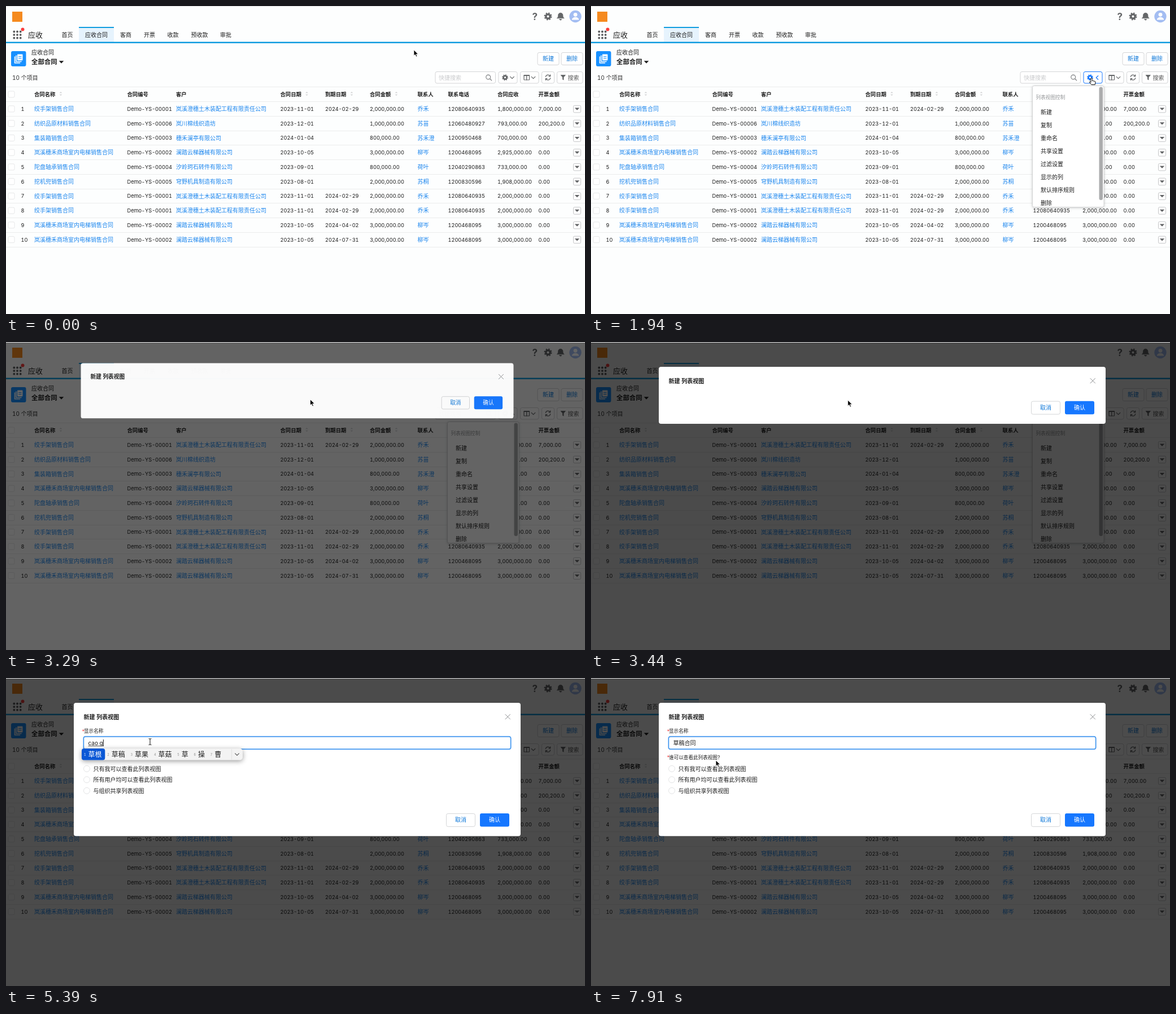
Animation, 1025 px wide and 546 px high, one loop 8000 ms. Source, as an HTML page:

```html
<!DOCTYPE html>
<html lang="zh-CN">
<head>
<meta charset="utf-8">
<title>列表视图</title>
<style>
html, body { margin: 0; width: 100%; height: 100%; overflow: hidden; background: #fdfefe; }
svg { display: block; width: 100vw; height: 100vh; }
text { font-family: Inter, "Noto Sans CJK SC", "Noto Sans CJK", sans-serif; font-feature-settings: "tnum"; white-space: pre; }
</style>
</head>
<body>
<svg id="stage" viewBox="0 0 1025 546"><g id="page"></g><g id="live"></g></svg>
<script>
const LOOP = 8000;
const INK = '#1c1c1c', LINK = '#1a85ee', BLUE = '#1677ff', GREY = '#646668', EDGE = '#d4d5d7';

// Drawing helpers; text is placed by its vertical centre.
const text = (x, y, str, size = 10, fill = INK, weight = 400) =>
  `<text x="${x}" y="${y + size * 0.375}" font-size="${size}" fill="${fill}" font-weight="${weight}">${str}</text>`;
const rect = (x, y, w, h, fill, r = 0, stroke = 'none', sw = 1) =>
  `<rect x="${x}" y="${y}" width="${w}" height="${h}" rx="${r}" fill="${fill}" stroke="${stroke}" stroke-width="${sw}"/>`;
const circle = (x, y, r, fill, stroke = 'none', sw = 1, extra = '') =>
  `<circle cx="${x}" cy="${y}" r="${r}" fill="${fill}" stroke="${stroke}" stroke-width="${sw}" ${extra}/>`;
const path = (d, fill, stroke = 'none', sw = 1) =>
  `<path d="${d}" fill="${fill}" stroke="${stroke}" stroke-width="${sw}" stroke-linecap="round" stroke-linejoin="round"/>`;
const at = (x, y, body, more = '') => `<g transform="translate(${x} ${y}) ${more}">${body}</g>`;
const box = (x, y, w, h, stroke = EDGE) => rect(x, y, w, h, '#fff', 3, stroke);
const triangle = (x, y, w, fill) => path(`M${x - w} ${y - w / 2}h${2 * w}l${-w} ${w}z`, fill);
const chevron = (x, y, color, turn = 0) =>
  at(x, y, path('M-3.3 -1.7L0 1.7L3.3 -1.7', 'none', color, 1.2), `rotate(${turn})`);
const gear = (x, y, r, color) =>
  circle(x, y, r * 0.55, 'none', color, r * 0.5) +
  circle(x, y, r * 0.88, 'none', color, r * 0.3, `stroke-dasharray="${r * 0.3456}"`);

const columns = [
  [50, '合同名称'], [214.5, '合同编号'], [301, '客户'], [485.5, '合同日期'], [565, '到期日期'],
  [644, '合同金额'], [728.5, '联系人'], [782.5, '联系电话'], [870, '合同应收'], [942.5, '开票金额']
];
const linked = [0, 2, 6], sortable = [0, 3, 4, 5];

const scaffold = '绞手架销售合同|Demo-YS-00001|岚溪澄穗土木装配工程有限责任公司|2023-11-01|2024-02-29|2,000,000.00|乔禾|12080640935|';
const lift = due => `岚溪穗禾商场室内电梯销售合同|Demo-YS-00002|澜踏云梯器械有限公司|2023-10-05|${due}|3,000,000.00|柳岑|1200468095|`;
const rows = [
  scaffold + '1,800,000.00|7,000.00',
  '纺织品原材料销售合同|Demo-YS-00006|岚川棉线织造坊|2023-12-01||1,000,000.00|苏苗|12060480927|793,000.00|200,200.00',
  '集装箱销售合同|Demo-YS-00003|穗禾澜亭有限公司|2024-01-04||800,000.00|苏禾澄|1200950468|700,000.00|0.00',
  lift('') + '2,925,000.00|0.00',
  '陀盘轴承销售合同|Demo-YS-00004|汐岭珂石转件有限公司|2023-09-01||800,000.00|荷叶|12040290863|733,000.00|0.00',
  '挖机兜销售合同|Demo-YS-00005|穹野机具制造有限公司|2023-08-01||2,000,000.00|苏桐|1200830596|1,908,000.00|0.00',
  scaffold + '2,000,000.00|0.00',
  scaffold + '2,000,000.00|0.00',
  lift('2024-04-02') + '3,000,000.00|0.00',
  lift('2024-07-31') + '3,000,000.00|0.00'
].map(row => row.split('|'));

function topBar() {
  let out = rect(0, 0, 1025, 1, '#dfe0e1') + rect(11, 10, 18, 18, '#f58a1f');
  out += text(931.5, 18.5, '?', 17, GREY, 700) + gear(959.5, 18.5, 6.8, GREY);
  out += path('M975.5 21.5c2-1.5 2-3 2-5a4.2 4.2 0 0 1 8.4 0c0 2 0 3.5 2 5zM980 23.5h3.5a1.7 1.5 0 0 1-3.5 0z', GREY, GREY, 0.8);
  out += circle(1008, 18.5, 10.7, '#a3bdf2') + circle(1008, 15.3, 3.4, '#fff') +
    path('M1001.8 24.5c0-6.5 12.4-6.5 12.4 0z', '#fff');
  for (let i = 0; i < 9; i++) out += circle(14.3 + i % 3 * 5.7, 45.5 + Math.floor(i / 3) * 5.6, 1.9, '#58595b');
  out += circle(29.5, 41.5, 3, '#fa3e3e') + text(39, 51, '应收', 12.9);
  out += rect(129, 37, 62, 27, '#e6f3fd') + rect(129, 37, 62, 2, '#109cdf') + rect(0, 63.5, 1025, 2.5, '#109cdf');
  [[98.5, '首页'], [140, '应收合同'], [202, '客商'], [244, '开票'], [285.5, '收款'], [327.5, '预收款'], [379, '审批']]
    .forEach(([x, label]) => out += text(x, 51.3, label));
  return out;
}

function listHead() {
  let out = rect(9, 80, 26.5, 27, '#1890ff', 3);
  out += path('M15.5 90v11h9', 'none', '#fff', 1.6) + path('M18 88v10.5h9', 'none', '#fff', 1.6) +
    rect(20, 85.5, 9.5, 11, '#fff', 1) + path('M22.5 89.5h4.5M22.5 92.5h4.5', 'none', '#1890ff', 1);
  out += text(45, 82.3, '应收合同') + text(45, 99, '全部合同', 11.4, INK, 700) + triangle(98, 99.5, 4.3, INK);
  out += box(941, 82.5, 38, 22) + text(950, 93.5, '新建', 10, '#0b76d8');
  out += box(983, 82.5, 38, 22) + text(992, 93.5, '删除', 10, '#0b76d8');
  out += text(11, 127, '10 个项目', 10, '#2e2e2e');
  out += box(760, 116.5, 106.5, 20.5) + text(766, 127, '快捷搜索', 10, '#c9cacc') +
    circle(853.7, 126, 3.9, 'none', '#77797b', 1.1) + path('M856.7 129l3 3', 'none', '#77797b', 1.1);
  out += box(910.5, 116.5, 32.5, 20.5) + rect(917, 122.5, 9.5, 8.5, 'none', 0.5, GREY, 1.2) +
    path('M917 123.3h9.5M921.7 123v8', 'none', GREY, 1.3) + chevron(933.5, 127, GREY);
  out += box(948.5, 116.5, 22, 20.5) +
    path('M955.3 125.5a4.3 4.3 0 0 1 8-1.2M963.7 127.7a4.3 4.3 0 0 1-8 1.2M963.7 121.8v2.8h-2.8M955.3 131.4v-2.8h2.8', 'none', GREY, 1.2);
  out += box(975.5, 116.5, 45.5, 20.5) + path('M981.5 122h9.5l-3.6 4.6v5l-2.3-1.4v-3.6z', GREY) +
    text(994.5, 127, '搜索', 10, '#555');
  return out;
}

function table() {
  const line = y => rect(0, y, 1025, 1, '#ebecec');
  const check = y => rect(4, y - 5.5, 11, 11, '#fff', 2, '#e6e7e8');
  let out = line(143) + line(169) + check(156.5);
  columns.forEach(([x, label], i) => {
    out += text(x, 156.5, label, 9.36, INK, 600);
    if (sortable.includes(i)) {
      const sx = x + label.length * 9.36 + 9.5;
      out += triangle(sx, 157.8, 2.3, '#cfd0d1') + path(`M${sx - 2.3} 154.2h4.6l-2.3 -2.3z`, '#cfd0d1');
    }
  });
  rows.forEach((cells, r) => {
    const y = 182.4 + r * 25.75;
    out += check(y) + text(26.5, y, r + 1, 9.2);
    cells.forEach((cell, i) =>
      out += linked.includes(i) ? text(columns[i][0], y, cell, 10, LINK) : text(columns[i][0], y, cell, 9.2));
    out += rect(990, y - 8, 35, 16, '#fdfefe') + rect(1004.5, y - 6, 13, 12.5, '#fff', 2, '#c4c5c7') +
      triangle(1011, y + 0.3, 4.2, '#606264') + line(Math.round(y + 12.4));
  });
  return out;
}

function gearButton(t) {
  const active = t >= 1490 && t < 3140, color = active ? BLUE : GREY;
  const turn = t < 1940 || t >= 4790 ? 0 : t < 2090 ? 90 : 180;
  return box(872, 116.5, 33, 20.5, active ? BLUE : EDGE) + gear(883.5, 126.7, 5.3, color) + chevron(896, 127, color, turn);
}

function menu(t) {
  if (t < 1940 || t >= 4790) return '';
  let out = `<g style="filter:drop-shadow(0 1px 2px #0003)">${rect(781.5, 141.5, 126.5, 215, '#fff', 3, '#d2d3d4')}</g>`;
  if (t >= 2540 && t < 3140) out += rect(782, 177, 117, 22, '#f3f3f3');
  out += text(787.5, 162, '列表视图控制', 8.65, '#939597');
  '新建 复制 重命名 共享设置 过滤设置 显示的列 默认排序规则 删除'.split(' ')
    .forEach((label, i) => out += text(796, 188 + i * 23, label));
  return out + rect(899.5, 143.5, 6.5, 200.5, '#acadae', 3.2);
}

// Each entry: start, committed text, letters being composed, candidates.
const typing = [
  [0, '', '', ''],
  [4790, '', 'c', '才 从 出 成 场 此 次'],
  [4940, '', 'ca', '擦 才 嚓 从 出 成 次'],
  [5090, '', 'cao', '草 操 曹 槽 糙 嘈 漕'],
  [5240, '', 'cao g', '草根 草稿 草果 草菇 草 操 曹'],
  [5530, '', 'cao ga', '草稿 草感 草根 草 操 曹'],
  [5680, '', 'cao gao', '草稿 操 草 曹 槽 糙'],
  [5830, '草稿', '', ''],
  [5970, '草稿', 'he', '和 喝 合 河 何 核 盒'],
  [6270, '草稿', 'he to', '合同 和他 和她 核桃 和谈 合体'],
  [6420, '草稿', 'he ton', '合同 和痛 核桶 和 喝 合'],
  [6720, '草稿', 'he tong', '合同 和童 核桶 和 喝 合'],
  [7020, '草稿合同', '', '']
];
const ruler = document.createElement('canvas').getContext('2d');

function inputMethod(t) {
  const [, done, letters, words] = typing.findLast(entry => entry[0] <= t);
  const start = 145.5 + done.length * 10;
  let out = text(145.5, 115, done);
  if (!letters) return out;
  ruler.font = '10px Inter, sans-serif';
  const end = start + ruler.measureText(letters).width;
  out += text(start, 115, letters) + rect(start, 120, end - start, 0.8, '#333') + rect(end, 109, 1, 12, '#111');

  const left = start - 11.5;
  out += `<g style="filter:drop-shadow(0 2px 4px #0006)">${rect(left, 125, 285, 20.5, '#f3f3f3', 5)}</g>`;
  let x = left;
  words.split(' ').forEach((word, i) => {
    const width = 17.3 + word.length * 12, first = i === 0;
    if (first) out += rect(x, 125, width, 20.5, '#0a58d6', 4);
    out += text(x + 4, 135.5, i + 1, 5.5, first ? '#fff' : '#8a8a8a') + text(x + 11.5, 135, word, 12, first ? '#fff' : '#222');
    x += width;
  });
  return out + rect(left + 265, 126, 0.7, 18.5, '#dcdcdc') + chevron(left + 275, 135.5, '#555');
}

function dialog(t) {
  if (t < 3140) return '';
  const p = Math.min(1, (t - 3100) / 300), loaded = t >= 3590, height = loaded ? 236.3 : 101;
  const foot = 44 + height - 28.6;
  let out = rect(120, 44, 791, height, '#fff', 4) + text(137.5, 69, '新建 列表视图', 10, INK, 600);
  out += path('M884 64.5l8.5 8.5M892.5 64.5l-8.5 8.5', 'none', '#8d8f91', 1);
  out += rect(779.5, foot - 11.3, 51, 23, '#fff', 3, EDGE) + text(795, foot, '取消', 10, '#0b76d8');
  out += rect(839, foot - 11.7, 52, 23.6, BLUE, 3) + text(855, foot, '确认', 10, '#fff');
  if (loaded) {
    const focused = t >= 4490;
    out += text(134, 95, '*', 9, '#f23d3d') + text(138, 94, '显示名称', 8.6);
    if (focused) out += rect(137.5, 104, 756, 22, 'none', 3, '#a9cffa', 2.6);
    out += rect(137.5, 104, 756, 22, '#fff', 3, '#3d94ee', focused ? 1.4 : 1);
    out += text(134, 141, '*', 9, '#f23d3d') + text(138, 140.5, '谁可以查看此列表视图?', 8.6);
    ['只有我可以查看此列表视图', '所有用户均可以查看此列表视图', '与组织共享列表视图'].forEach((label, i) => {
      const y = 160.8 + i * 19.5;
      out += circle(143, y, 5.5, '#fff', '#e3e4e5') + text(154.5, y, label);
    });
    out += inputMethod(t);
  }
  const scale = 1 - 0.0865 * (1 - p), top = 44 - 17.7 * (1 - p), dim = 0.7 * (1 - (1 - p) ** 2);
  return `<rect y="1" width="1025" height="545" opacity="${dim}"/>` +
    `<g opacity="${Math.min(1, p * 1.53)}" transform="translate(515.5 ${top}) scale(${scale}) translate(-515.5 -44)">${out}</g>`;
}

const track = [
  [0, 722, 78], [290, 722, 78], [1040, 889, 121], [1340, 889, 121], [1490, 886, 127.5], [1940, 886, 127.5],
  [2840, 812, 186], [2990, 812, 186], [3290, 538.5, 102], [3740, 287, 106], [4040, 257, 108],
  [4190, 255, 113], [7470, 255, 113], [7910, 221, 146], [LOOP, 221, 146]
];

function pointer(t) {
  const i = track.findLastIndex(key => key[0] <= t);
  const [t0, x0, y0] = track[i], [t1, x1, y1] = track[i + 1];
  const k = (t - t0) / (t1 - t0), x = x0 + (x1 - x0) * k, y = y0 + (y1 - y0) * k;
  if (t >= 1490 && t < 3140)
    return at(x, y, path('M-1.2 0.8q1.2-1.5 2.3 0v4l5 1.2q1 .3 .9 1.5l-.8 4.5h-6.2l-3.8-4.7q.8-1.5 2.6 .2z', '#fff', '#111', 1));
  if (t >= 4190 && t < 7620)
    return at(x, y, path('M-2-5.5q2 0 2 1.2q0-1.2 2-1.2M0-4.5v9M-2 5.5q2 0 2-1.2q0 1.2 2 1.2', 'none', '#222', 1.1));
  return at(x, y, path('M0 0v10.2l2.4-2.2l1.7 4l1.8-.8l-1.7-3.8h3.3z', '#000', '#fff', 0.8));
}

// The screen refreshes about every 150 ms.
function snap(t) {
  if (t < 440) return 0;
  const offset = t < 5530 ? 440 : t < 5830 ? 430 : t < 7910 ? 420 : 410;
  return offset + Math.floor((t - offset) / 150) * 150;
}

document.getElementById('page').innerHTML = topBar() + listHead() + table();
const live = document.getElementById('live');
let shown = -1;

function frame() {
  const t = snap(performance.now() % LOOP);
  if (t !== shown) {
    live.innerHTML = gearButton(t) + menu(t) + dialog(t) + pointer(t);
    shown = t;
  }
  requestAnimationFrame(frame);
}
frame();
</script>
</body>
</html>
```
